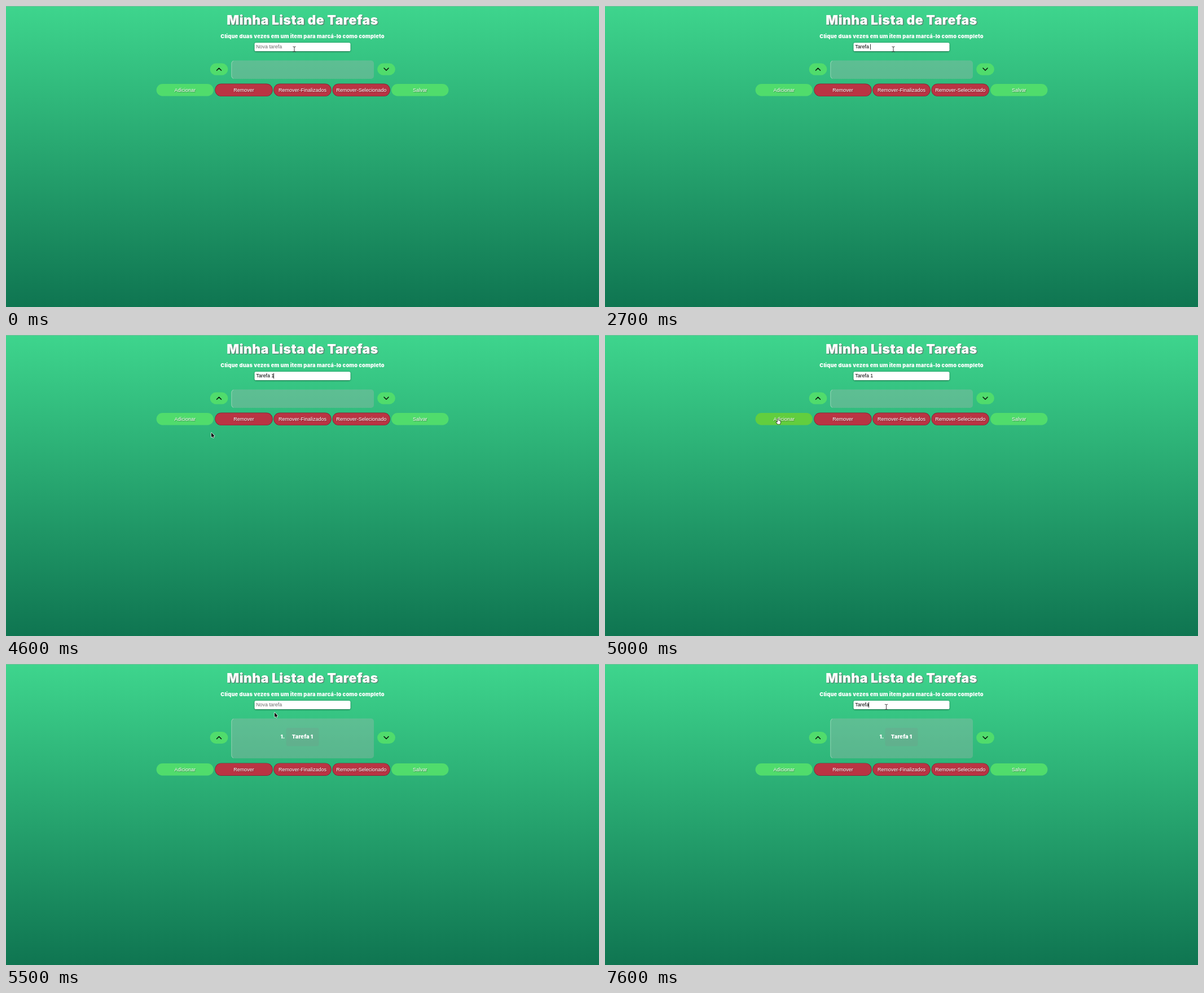
Animation of 1051x533 px, one loop 8000 ms. Source, as an HTML page with a canvas:

```html
<!DOCTYPE html>
<html lang="pt-BR">
<head>
<meta charset="utf-8">
<title>Minha Lista de Tarefas</title>
<style>
html, body { margin: 0; width: 100%; height: 100%; overflow: hidden; background: #27a56f; }
canvas { display: block; width: 1051px; height: 533px; }
</style>
</head>
<body>
<canvas id="stage"></canvas>
<script>
const W = 1051, H = 533, LOOP = 8000, MID = 525.5;
const canvas = document.getElementById('stage');
const ctx = canvas.getContext('2d');
const dpr = window.devicePixelRatio || 1;
canvas.width = W * dpr;
canvas.height = H * dpr;

const SANS = '"Liberation Sans", Arial, sans-serif';
const HEAVY = 'Inter, "Open Sans", sans-serif';
const GREEN = '#50dc6c', HOVER = '#62ce3e', RED = '#ba3443';
const ADDED = 5100;

// [start, text]; empty text shows the placeholder
const typing = [
  [0, ''], [700, 'T'], [1000, 'Ta'], [1500, 'Tar'], [1600, 'Tare'],
  [2000, 'Tarefa1'], [2700, 'Tarefa '], [3300, 'Tarefa 1'], [ADDED, ''],
  [6500, 'T'], [6900, 'Ta'], [7000, 'Tar'], [7100, 'Tare'],
  [7300, 'Taref'], [7600, 'Tarefa']
];
const caretOn = [[200, 3200], [3300, 3900], [4300, 4800], [5800, 6300], [6500, LOOP]];

// [start, x, y, shape]
const pointer = [
  [0, 511, 76.5, 'beam'], [4200, 507, 82, 'arrow'], [4300, 486, 96, 'arrow'],
  [4400, 448, 122, 'arrow'], [4500, 402, 161, 'arrow'], [4600, 364, 173, 'arrow'],
  [4700, 336, 175, 'arrow'], [4800, 318, 164, 'arrow'], [4900, 308, 152, 'hand'],
  [5000, 305.5, 148.5, 'hand'], [5100, 315, 148.5, 'arrow'], [5200, 372, 130, 'hand'],
  [5300, 408, 115, 'arrow'], [5400, 446, 99, 'arrow'], [5500, 476, 86, 'arrow'],
  [5600, 492, 77, 'beam'], [5700, 497, 75, 'beam'], [5800, 498.5, 75, 'beam'],
  [7600, 498.5, 76, 'beam']
];

const during = (t, a, b) => t >= a && t < b;
const latest = (list, t) => list.filter(item => item[0] <= t).pop();

function pill(x, y, w, h, r, fill) {
  ctx.beginPath();
  ctx.roundRect(x, y, w, h, r);
  ctx.fillStyle = fill;
  ctx.fill();
}

function shadow(color, x, y, blur) {
  ctx.shadowColor = color;
  ctx.shadowOffsetX = x * dpr;
  ctx.shadowOffsetY = y * dpr;
  ctx.shadowBlur = blur * dpr;
}

function label(str, x, y, font, fill = '#fff', align = 'center') {
  ctx.font = font;
  ctx.fillStyle = fill;
  ctx.textAlign = align;
  ctx.fillText(str, x, y);
}

// Heavy text is set slightly loose
function heavy(str, x, y, size, align) {
  ctx.save();
  ctx.letterSpacing = size * 0.019 + 'px';
  label(str, x, y, `900 ${size}px ${HEAVY}`, '#fff', align);
  ctx.restore();
}

function polyline(points, close) {
  ctx.beginPath();
  points.forEach(([x, y]) => ctx.lineTo(x, y));
  if (close) ctx.closePath();
}

function backdrop() {
  const g = ctx.createLinearGradient(0, 0, 0, H);
  g.addColorStop(0, '#3ed58d');
  g.addColorStop(1, '#0f7551');
  ctx.fillStyle = g;
  ctx.fillRect(0, 0, W, H);
  ctx.fillStyle = 'rgba(170,170,170,.55)';
  ctx.fillRect(0, 0, W, 1);
}

function heading() {
  ctx.save();
  shadow('rgba(100,105,105,.9)', 1.4, 1.4, 1.4);
  heavy('Minha Lista de Tarefas', MID, 33, 23);
  ctx.restore();
  heavy('Clique duas vezes em um item para marcá-lo como completo', MID, 57.3, 9.3);
}

function input(t) {
  ctx.save();
  shadow('rgba(0,0,0,.55)', 0, 0.7, 2.7);
  pill(440.5, 64.9, 170, 15.2, 2.7, '#fff');
  ctx.restore();

  const text = latest(typing, t)[1];
  const font = `8.9px ${SANS}`;
  label(text || 'Nova tarefa', 443.2, 75.2, font, text ? '#000' : '#6c6c6c', 'left');
  if (caretOn.some(([a, b]) => during(t, a, b))) {
    const x = text ? Math.floor(442.9 + ctx.measureText(text).width) : 443;
    ctx.fillStyle = '#000';
    ctx.fillRect(x, 67.5, 0.8, 9.8);
  }
}

function list(added) {
  const h = added ? 70.5 : 32.5;
  pill(399.5, 96.5, 252.5, h, 5, 'rgba(185,180,185,.3)');
  ctx.save();
  ctx.beginPath();
  ctx.rect(399, 96, 4, h + 1);
  ctx.clip();
  ctx.beginPath();
  ctx.roundRect(399.8, 96.8, 255, h - 0.6, 5);
  ctx.strokeStyle = 'rgba(235,240,235,.55)';
  ctx.lineWidth = 0.8;
  ctx.stroke();
  ctx.restore();
  if (!added) return;
  pill(496.5, 113, 58, 32.5, 4, 'rgba(128,128,128,.16)');
  heavy('1.', 494.5, 132.2, 9.3, 'right');
  heavy('Tarefa 1', MID, 132.2, 9.3);
}

function moveButton(cx, cy, dir, fill) {
  pill(cx - 15.9, cy - 10.4, 31.8, 20.8, 10.4, fill);
  polyline([[cx - 4, cy + 2 * dir], [cx, cy - 2 * dir], [cx + 4, cy + 2 * dir]]);
  ctx.strokeStyle = '#06180c';
  ctx.lineWidth = 1.6;
  ctx.lineCap = 'round';
  ctx.lineJoin = 'round';
  ctx.stroke();
}

function button(str, cx, cy, fill) {
  if (fill === RED) {
    pill(cx - 51.2, cy - 11.3, 102.4, 22.6, 11.3, '#7d1e30');
    pill(cx - 50.5, cy - 10.6, 101, 21.2, 10.6, RED);
  } else {
    pill(cx - 50.6, cy - 10.7, 101.2, 21.4, 10.7, fill);
  }
  ctx.save();
  shadow('rgba(0,0,0,.4)', 0.7, 0.7, 0.7);
  label(str, cx, cy + 3.1, `9px ${SANS}`);
  ctx.restore();
}

const arrowShape = [[0, 0], [0, 8], [1.8, 6.4], [3, 9.1], [4.4, 8.5], [3.3, 5.9], [5.7, 5.7]];
const handShape = [[0.2, 0.6], [1, 0], [1.8, 0.6], [1.9, 3.3], [4.6, 3.7], [5.6, 4.6],
  [5.4, 7], [4.6, 9.2], [0.4, 9.2], [-2.2, 5.8], [-1.6, 5], [0.2, 6.2]];

function cursor(x, y, shape) {
  ctx.save();
  ctx.translate(x, y);
  ctx.lineJoin = 'round';
  if (shape === 'beam') {
    ctx.strokeStyle = '#333';
    ctx.lineWidth = 0.9;
    ctx.beginPath();
    for (const s of [-1, 1]) {
      ctx.moveTo(-2.2, 4.6 * s);
      ctx.quadraticCurveTo(0, 4.6 * s, 0, 3.4 * s);
      ctx.quadraticCurveTo(0, 4.6 * s, 2.2, 4.6 * s);
    }
    ctx.moveTo(0, -4);
    ctx.lineTo(0, 4);
    ctx.stroke();
  } else {
    const hand = shape === 'hand';
    polyline(hand ? handShape : arrowShape, true);
    ctx.strokeStyle = hand ? '#111' : '#fff';
    ctx.lineWidth = 1.3;
    ctx.stroke();
    ctx.fillStyle = hand ? '#fff' : '#000';
    ctx.fill();
  }
  ctx.restore();
}

function draw(t) {
  const added = t >= ADDED;
  const arrowsY = added ? 130.5 : 112;
  const rowY = added ? 186.7 : 148.8;
  ctx.setTransform(dpr, 0, 0, dpr, 0, 0);
  backdrop();
  heading();
  input(t);
  list(added);
  moveButton(377.5, arrowsY, 1, during(t, 5100, 5300) ? HOVER : GREEN);
  moveButton(674, arrowsY, -1, GREEN);
  button('Adicionar', 317.2, rowY, during(t, 4900, ADDED) ? HOVER : GREEN);
  button('Remover', 421.5, rowY, RED);
  button('Remover-Finalizados', 525.5, rowY, RED);
  button('Remover-Selecionado', 629.7, rowY, RED);
  button('Salvar', 733.8, rowY, GREEN);
  const [, x, y, shape] = latest(pointer, t);
  cursor(x, y, shape);
}

const start = performance.now();
function tick() {
  draw((performance.now() - start) % LOOP);
  requestAnimationFrame(tick);
}
tick();
</script>
</body>
</html>
```
